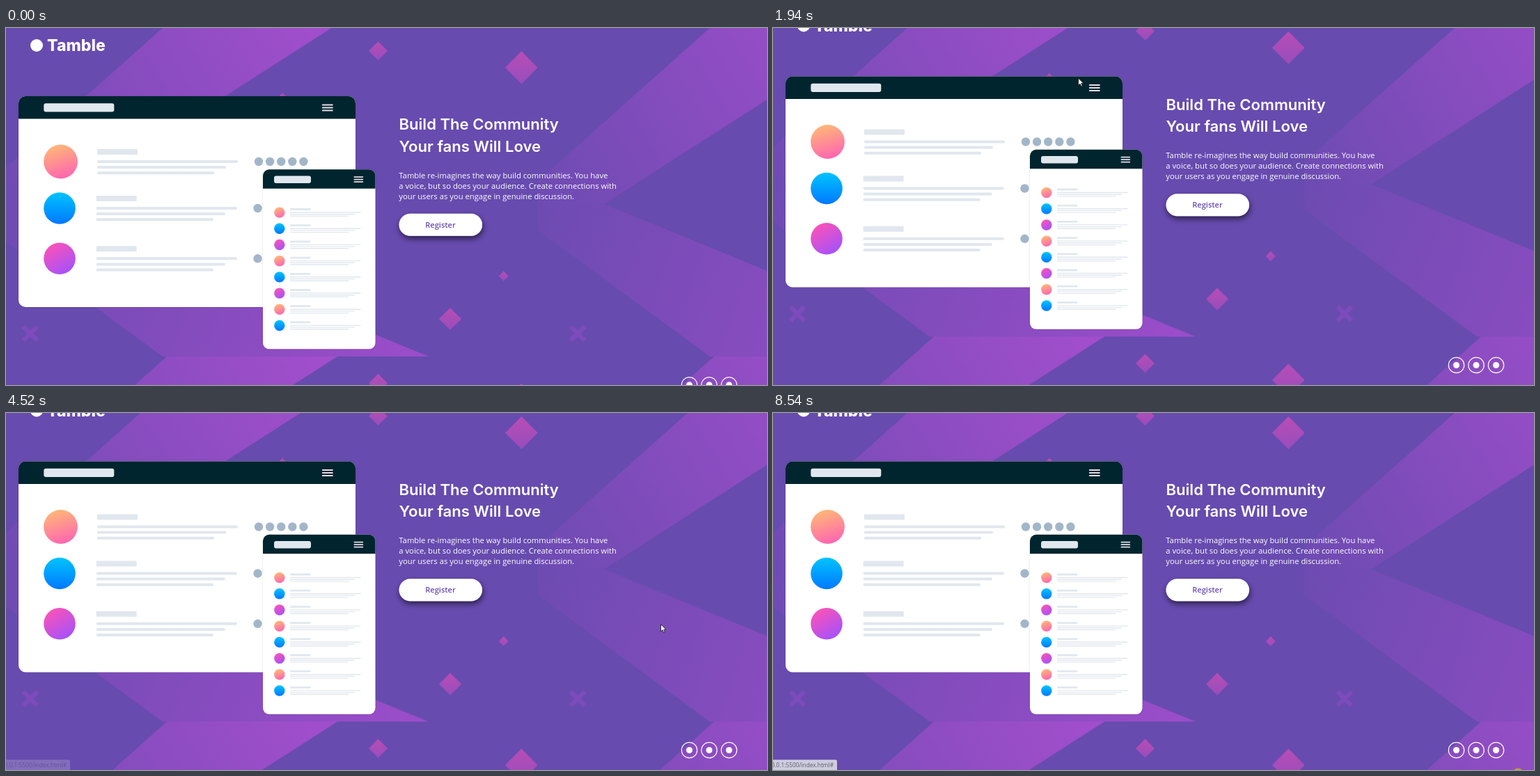
These frames come from a looping animation (1093x513 px, 8.6 s). An HTML page:

```html
<!DOCTYPE html>
<html lang="en">
<head>
<meta charset="utf-8">
<title>Community landing page</title>
<style>
  html, body { margin: 0; width: 100%; height: 100%; overflow: hidden; background: #674baf; }
  svg { display: block; }
  text { font-family: "Open Sans", "Noto Sans", sans-serif; }
  .title { font: 600 22.1px Inter, sans-serif; }
  .brand { font: 800 23px Inter, sans-serif; }
  .body { font-size: 11.25px; }
</style>
</head>
<body>
<svg id="stage" width="1093" height="513" viewBox="0 0 1093 513"></svg>
<script>
const stage = document.getElementById('stage');
const PALE = '#e1e7ee', DARK = '#00252e';
const VIOLET = [103, 75, 175], WHITE = [255, 255, 255], PINK = [232, 130, 232];
const AVATARS = ['warm', 'blue', 'pink'];
const SOCIAL = [981.5, 1010, 1038.5];

const rect = (x, y, w, h, r, fill, more = '') =>
  `<rect x="${x}" y="${y}" width="${w}" height="${h}" rx="${r}" fill="${fill}" ${more}/>`;
const circle = (x, y, r, fill, more = '') =>
  `<circle cx="${x}" cy="${y}" r="${r}" fill="${fill}" ${more}/>`;
const diamond = (x, y, r) =>
  `<path d="M${x} ${y - r}l${r} ${r}l${-r} ${r}l${-r} ${-r}z" fill="url(#gem)"/>`;
const text = (x, y, cls, s, more = '') =>
  `<text x="${x}" y="${y}" class="${cls}" fill="#fff" ${more}>${s}</text>`;
const gradient = (id, [x1, y1, x2, y2], a, b, units = 'objectBoundingBox') =>
  `<linearGradient id="${id}" gradientUnits="${units}" x1="${x1}" y1="${y1}" x2="${x2}" y2="${y2}">
   <stop stop-color="${a}"/><stop offset="1" stop-color="${b}"/></linearGradient>`;
const menu = (x, y, w, gap, h) =>
  [-1, 0, 1].map(i => rect(x, y + i * gap - h / 2, w, h, h / 2, '#e6dcea')).join('');

// A window: rounded sheet with a dark top bar
function sheet(x, y, w, h, r, bar) {
  return rect(x, y, w, h, r, '#fff', 'filter="url(#soft)"') +
    `<path d="M${x} ${y + bar}V${y + r}a${r} ${r} 0 0 1 ${r} ${-r}H${x + w - r}a${r} ${r} 0 0 1 ${r} ${r}V${y + bar}z" fill="${DARK}"/>`;
}

function desktop() {
  let s = sheet(18, 98, 484, 303, 10, 32.5) +
    rect(54.3, 108.3, 101, 12.3, 3, PALE) + menu(453.8, 114.5, 16, 4.1, 2);
  [192, 259, 331.3].forEach((y, i) => {
    const x = i ? 129.7 : 131;
    s += circle(i ? 77 : 78.5, y, i ? 22.8 : 24.4, `url(#${AVATARS[i]})`);
    s += rect(x, y - 18, 58, 8, 1, PALE);
    for (let k = 0; k < 3; k++) s += rect(x, y - 2 + k * 8.1, 202 - 17 * k, 4, 1.5, PALE);
    for (let k = 0; k < (i ? 1 : 5); k++)
      s += circle((i ? 361.5 : 363) + k * 16.1, y, 6.2, '#a3b6c9');
  });
  return s;
}

function phone() {
  let s = sheet(369, 203.3, 161.5, 258, 9, 27.4) +
    rect(385, 212.4, 53, 10.6, 3, PALE) + menu(499.5, 217.6, 13.7, 3.5, 1.7);
  for (let i = 0; i < 8; i++) {
    const y = 265.1 + i * 23.2;
    s += circle(392.8, y, 7.7, `url(#${AVATARS[i % 3]})`) + rect(408, y - 6, 29.5, 2.8, 1, PALE);
    for (let k = 0; k < 3; k++) s += rect(408, y - .8 + k * 2.7, 101.5 - 8.7 * k, 1.4, .5, PALE);
  }
  return s;
}

stage.innerHTML = `<defs>
  ${gradient('upper', [-23, 265, 430, -10], '#6c4bb1', '#a04ecb', 'userSpaceOnUse')}
  ${gradient('lower', [-23, 260, 600, 480], '#6d4bb1', '#9c4dca', 'userSpaceOnUse')}
  ${gradient('gem', [.5, 0, .5, 1], '#b84db5', '#984dbd')}
  ${gradient('warm', [.35, 0, .65, 1], '#ffb876', '#ff64b2')}
  ${gradient('blue', [.5, 0, .5, 1], '#00c4ff', '#0078ff')}
  ${gradient('pink', [.2, 0, .8, 1], '#ff52b4', '#a052ff')}
  <filter id="soft" x="-10%" y="-10%" width="120%" height="120%">
    <feDropShadow dx="0" dy="0" stdDeviation="1.5" flood-color="#203" flood-opacity=".12"/></filter>
  <filter id="drop" x="-20%" y="-60%" width="140%" height="240%">
    <feDropShadow dx="1" dy="4" stdDeviation="4.5" flood-color="#000" flood-opacity=".6"/></filter>
  <pattern id="tile" patternUnits="userSpaceOnUse" x="-23" y="-5.5" width="786" height="477.5">
    <g transform="translate(23 5.5)">
      <path d="M231-5.5H476L73 253H-23V221z" fill="url(#upper)"/>
      <path d="M-23 253H73L607 472H225L-23 290z" fill="url(#lower)"/>
      ${diamond(534.5, 33, 13.5)}${diamond(740.3, 57, 23.5)}${diamond(714.7, 356.5, 7)}
      ${diamond(638, 418, 16)}${diamond(397, 102, 8.5)}
      <path d="M25 429l20 20m0-20l-20 20" stroke="#7d4bbb" stroke-width="6.5"/>
    </g>
  </pattern></defs>
  <g id="page">
    ${rect(0, 0, 1093, 545, 0, 'url(#tile)')}
    ${circle(44, 25, 9, '#fff')}${text(59, 33, 'brand', 'Tamble')}
    ${desktop()}${phone()}
    ${text(564.5, 146, 'title', 'Build The Community')}
    ${text(564.5, 177.5, 'title', 'Your fans Will Love')}
    ${['Tamble re-imagines the way build communities. You have',
       'a voice, but so does your audience. Create connections with',
       'your users as you engage in genuine discussion.'
      ].map((line, i) => text(564.3, 215.7 + 15 * i, 'body', line)).join('')}
    ${rect(564.5, 266.8, 119.5, 32, 16, '#fff', 'id="button" filter="url(#drop)"')}
    ${text(624, 286.9, '', 'Register', 'id="label" font-size="11" font-weight="600" text-anchor="middle"')}
    ${SOCIAL.map((x, i) => circle(x, 513, 11.2, '#e882e8', `id="social${i}" stroke="#fff" stroke-width="1.2"`)
      + circle(x, 513, 4.5, '#fff')).join('')}
  </g>
  <g id="status">
    <path d="M0 498.3H89.5a2.5 2.5 0 0 1 2.5 2.5V513H0z" fill="#dee1e6"/>
    ${text(87, 509, '', '127.0.0.1:5500/index.html#', 'font-size="8.3" text-anchor="end" style="fill:#5b5f66"')}
  </g>
  ${circle(1070, 519, 8.5, '#b9a045', 'id="dot"')}
  <g id="cursor" stroke="#111" stroke-width=".8" stroke-linejoin="round" fill="#fff">
    <path id="arrow" d="M0 0V10.2L2.4 8L4 11.6L5.7 10.9L4.1 7.4H7.3z"/>
    <path id="hand" d="M-1.2 .8Q0-.8 1.2 .8V4.6L5 5.4Q6 5.8 5.8 7.4L5 11.8H-.8L-3.8 7.6Q-3.4 6-1.2 7.6z"/>
  </g>`;

const el = id => document.getElementById(id);
const show = (id, on) => el(id).style.display = on ? '' : 'none';
const clamp = v => Math.max(0, Math.min(1, v));
const mix = (a, b, k) => `rgb(${a.map((v, i) => Math.round(v + (b[i] - v) * k))})`;

const LOOP = 8600, SCROLL = 28.5, TRAVEL = 300;

// Pointer stops: arrival time, x, y; each move lasts at most TRAVEL
const STOPS = [
  [180, 803, 452], [380, 443, 244], [850, 162, 107], [1980, 480, 67], [2250, 912, 190],
  [2520, 665, 312], [2690, 630, 262], [2930, 603, 288], [3150, 620, 258], [3630, 623, 303],
  [3840, 619.5, 276.5], [3960, 640, 262], [4320, 891, 322], [4650, 978, 290], [5200, 981, 488],
  [6070, 1009, 488], [6700, 1038, 488], [7260, 1001, 488.5], [7870, 981, 490], [8400, 1062, 514]
];

function pointer(t) {
  const i = STOPS.findIndex(s => s[0] > t);
  if (i < 1) return null;
  const [t0, x0, y0] = STOPS[i - 1], [t1, x1, y1] = STOPS[i];
  const k = clamp(1 - (t1 - t) / Math.min(TRAVEL, t1 - t0));
  return [x0 + (x1 - x0) * k, y0 + (y1 - y0) * k];
}

const onButton = ([x, y]) => Math.abs(x - 624) < 60 && Math.abs(y - 254) < 16;
const onSocial = cx => ([x, y]) => Math.hypot(x - cx, y - 484.5) < 11.2;
const onStrip = ([x, y]) => Math.abs(x - 1010) < 40 && Math.abs(y - 484.5) < 11.2;
const onLink = p => onButton(p) || onStrip(p);

// Share of the last `span` ms spent over a target: a linear fade in and out
function fade(test, t, span) {
  let hits = 0;
  for (let k = 0; k < span; k += 5) {
    const p = pointer(t - k);
    if (p && test(p)) hits++;
  }
  return hits * 5 / span;
}

function draw(t) {
  const k = clamp((t - 1200) / 300);
  el('page').setAttribute('transform', `translate(0 ${-SCROLL * k * k * (3 - 2 * k)})`);

  const hot = fade(onButton, t, 300);
  el('button').style.fill = mix(WHITE, PINK, hot);
  el('label').style.fill = mix(VIOLET, WHITE, hot);
  SOCIAL.forEach((x, i) => el('social' + i).setAttribute('fill-opacity', fade(onSocial(x), t, 200)));
  el('status').setAttribute('opacity', fade(onLink, t - 350, 150));
  show('dot', t >= 8470);

  const p = pointer(t);
  show('cursor', p);
  if (p) {
    const over = onLink(p);
    show('arrow', !over);
    show('hand', over);
    el('cursor').setAttribute('transform', `translate(${p})`);
  }
}

const start = performance.now();
function tick() {
  draw((performance.now() - start) % LOOP);
  requestAnimationFrame(tick);
}
tick();
</script>
</body>
</html>
```
